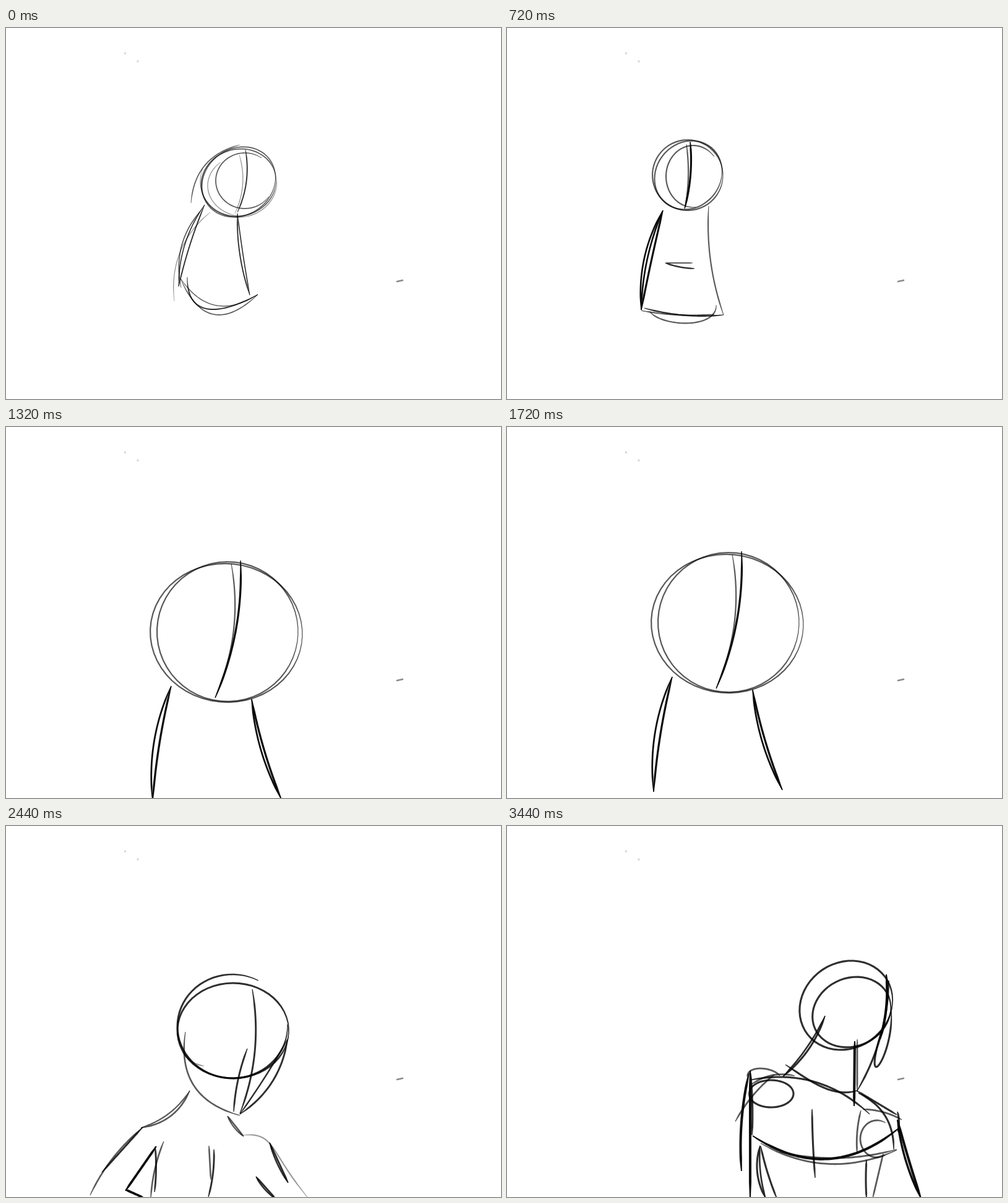
An HTML page with a canvas for the animation above (3480 ms loop, 800 px wide and 600 px high).

```html
<!DOCTYPE html>
<html lang="en">
<head>
<meta charset="utf-8">
<title>Turning figure sketch</title>
<style>
  html, body { margin: 0; width: 100%; height: 100%; overflow: hidden; background: #fff; }
  canvas { display: block; }
</style>
</head>
<body>
<canvas id="stage" width="800" height="600"></canvas>
<script>
const LOOP = 3480, N = 56;
const ctx = document.getElementById("stage").getContext("2d");
const mix = (a, b, k) => a + (b - a) * k;
const sample = f => Array.from({ length: N + 1 }, (_, i) => f(i / N));
const mark = f => ({ w: 1, a: .82, pts: sample(f) });

// One bowed stroke per bow, all between the same ends.
// Positive bows go left of a downward stroke and below a rightward one.
function arc(x0, y0, x1, y1, ...bows) {
  const dx = x1 - x0, dy = y1 - y0, len = Math.hypot(dx, dy);
  return bows.map(bow => mark(u => {
    const h = 4 * u * (1 - u) * bow / len;
    return [x0 + dx * u - dy * h, y0 + dy * u + dx * h];
  }));
}

// Part of an ellipse, angles in degrees, counted clockwise from the right
function loop(x, y, rx, ry, tilt = 0, from = 10, sweep = -375) {
  const r = Math.PI / 180, c = Math.cos(tilt * r), s = Math.sin(tilt * r);
  return [mark(u => {
    const t = (from + sweep * u - tilt) * r, p = rx * Math.cos(t), q = ry * Math.sin(t);
    return [x + p * c - q * s, y + p * s + q * c];
  })];
}

// Cubic curve between two ends with two handles
function bend(x0, y0, x1, y1, x2, y2, x3, y3) {
  const axis = (a, b, c, d, u) => {
    const v = 1 - u;
    return v * v * v * a + 3 * v * v * u * b + 3 * v * u * u * c + u * u * u * d;
  };
  return [mark(u => [axis(x0, x1, x2, x3, u), axis(y0, y1, y2, y3, u)])];
}

const press = (w, a) => list => list.map(s => ({ ...s, w, a }));
const bold = press(1.3, .95), soft = press(.9, .65), faint = press(.75, .4);

// Later passes of a part are drawn lighter
function pose(x, y, size, weight, parts) {
  const lines = {};
  for (const name in parts) {
    parts[name].forEach((s, i) => lines[name + i] = { ...s, w: s.w * weight * (i ? .85 : 1) });
  }
  return { head: [x, y, size], lines };
}

const warp = (s, f) => ({ ...s, pts: s.pts.map(([x, y]) => f(x, y)) });

function reshape(p, f) {
  const lines = {};
  for (const name in p.lines) lines[name] = warp(p.lines[name], f);
  return { head: [...f(p.head[0], p.head[1]), p.head[2]], lines };
}

const back = pose(376, 250, 61, 1.9, {
  headA: soft(loop(376, 250, 61, 54, -15)),
  headB: soft(loop(376, 249, 62, 54, -35)),
  inner: soft(loop(386, 247, 47, 45, 0, -55, -270)),
  ghost: faint(loop(376, 248, 62, 58, 0, 200, -200)),
  ghost2: faint(loop(386, 255, 60, 50, 0, 230, -130)),
  sweep: soft(arc(299, 283, 378, 189, -22)),
  mid: arc(387, 197, 374, 298, -8),
  mid2: faint(arc(377, 205, 370, 300, -9)),
  left: arc(321, 286, 279, 418, 3, 11),
  edge: soft(arc(315, 295, 283, 420, 16)),
  edge2: faint(arc(330, 298, 272, 442, 21)),
  right: arc(374, 300, 394, 432, 6, 1),
  hem: bend(293, 403, 292, 465, 340, 468, 407, 431),
  hem2: soft(arc(282, 405, 407, 431, 46, 31))
});

const small = pose(292, 238, 57, 2.4, {
  headA: soft(loop(292, 238, 57, 57)),
  headB: soft(loop(293, 238, 58, 52, -50)),
  inner: soft(loop(301, 240, 44, 50, 0, -40, -235)),
  mid: bold(arc(296, 184, 287, 292, -5)),
  mid2: soft(arc(290, 188, 288, 290, -4)),
  left: bold(arc(252, 295, 217, 456, 1, 8, 13)),
  right: soft(arc(326, 288, 350, 464, 9)),
  hem: arc(222, 453, 350, 464, 6),
  hem2: soft(bend(230, 458, 250, 484, 340, 487, 338, 448)),
  hem3: soft(arc(217, 457, 335, 463, 4)),
  belt: soft(arc(256, 380, 300, 380, 0)),
  belt2: arc(256, 380, 303, 389, 2)
});

const near = pose(356, 331, 120, 2.5, {
  headA: soft(loop(356, 333, 123, 112, 5)),
  headB: soft(loop(358, 331, 114, 113)),
  mid: bold(arc(379, 216, 338, 438, -13)),
  mid2: soft(arc(364, 221, 340, 432, -16)),
  left: bold(arc(267, 419, 237, 605, 4, 13)),
  right: bold(arc(397, 440, 445, 602, 4, 9))
});

const wide = pose(358, 322, 120, 2.9, {
  headA: loop(358, 322, 120, 116, 0, 8, -228),
  headB: loop(367, 328, 120, 113, 0, -88, -130),
  jaw: faint(arc(240, 350, 360, 474, 25)),
  jawR: soft(arc(481, 315, 372, 472, -12, -20)),
  chin: arc(440, 395, 360, 475, -3),
  brow: soft(arc(256, 372, 477, 377, 35)),
  mid: bold(arc(409, 258, 360, 474, -22)),
  mid2: soft(arc(391, 200, 400, 375, -12)),
  neckL: soft(arc(268, 425, 249, 483, -3)),
  armTopL: soft(arc(42, 343, 250, 453, 9)),
  armPatchL: bold(arc(142, 407, 245, 447, 4)),
  armBotL: bold(arc(42, 343, 205, 495, 12)),
  armPitL: soft(bend(150, 450, 220, 500, 254, 515, 254, 602)),
  torsoL: bold(arc(210, 495, 254, 597, 0, -4)),
  armTopR: arc(378, 478, 618, 485, -1),
  armPatchR: bold(arc(380, 479, 520, 481, 0)),
  handR: soft(bend(600, 485, 643, 476, 647, 517, 600, 517)),
  handR2: faint(arc(612, 485, 612, 512, -9)),
  armBotR: soft(arc(432, 518, 622, 514, 7, 9)),
  neckR: bold(arc(375, 469, 398, 520, 0, -3)),
  torsoR: bold(arc(429, 508, 420, 602, 2)),
  spine: arc(352, 503, 328, 597, -10),
  spine2: soft(arc(343, 503, 350, 560, 0)),
  collar: soft(arc(266, 529, 361, 559, 0)),
  dot: arc(339, 422, 340, 425, 0)
});

const lean = pose(367, 325, 88, 2.9, {
  headA: loop(366, 324, 89, 84, 0, -62, -300),
  headB: loop(367, 331, 90, 77),
  jaw: soft(arc(290, 333, 378, 468, 36)),
  jawR: arc(455, 345, 378, 466, -16, -2),
  cheek: faint(arc(285, 365, 320, 388, 5)),
  mid: arc(398, 264, 378, 465, -14),
  mid2: arc(390, 360, 368, 462, 4),
  neckL: soft(arc(297, 428, 218, 488, -14, -9)),
  armTopL: soft(arc(136, 597, 222, 487, -8)),
  armPatchL: arc(155, 560, 220, 488, 0),
  armBotL: bold(arc(193, 590, 243, 518, 0)),
  armPitL: soft(arc(255, 510, 234, 602, 4)),
  cuff: bold(arc(193, 588, 222, 601, 0)),
  torsoL: arc(241, 518, 240, 592, -2),
  neckR: soft(arc(358, 469, 384, 502, 0, 3)),
  armTopR: faint(bend(383, 500, 435, 495, 425, 525, 487, 600)),
  armPatchR: arc(426, 512, 456, 577, 0, 3),
  armBotR: arc(404, 567, 436, 603, 0, 3),
  spine: arc(336, 523, 327, 600, -3),
  spine2: soft(arc(328, 517, 331, 572, 0))
});

const side = pose(444, 327, 84, 3, {
  headA: loop(443, 327, 86, 78),
  headB: loop(441, 328, 72, 76),
  jaw: arc(362, 310, 473, 490, 22, 34),
  cheek: soft(arc(368, 345, 430, 475, 8)),
  brow: arc(357, 330, 376, 283, -5),
  jawR: bold(arc(521, 297, 471, 497, -2)),
  chin: soft(arc(529, 335, 475, 492, -6)),
  mid: soft(arc(508, 254, 473, 490, -16)),
  neckL: arc(382, 430, 280, 482, -8, -14),
  armTopL: bold(arc(269, 602, 312, 462, -17)),
  armPatchL: bold(arc(276, 597, 282, 500, -3)),
  neckR: bold(arc(425, 473, 440, 548, 4, 0)),
  flankR: soft(arc(440, 545, 456, 602, -7)),
  tick: faint(arc(440, 545, 460, 572, 0)),
  spine: bold(arc(345, 495, 347, 602, 0)),
  spine2: soft(arc(341, 487, 348, 602, 0))
});

const front = pose(548, 290, 74, 3.1, {
  headA: loop(548, 290, 78, 69, -35),
  headB: loop(557, 301, 65, 55, -25),
  throat: bend(450, 386, 490, 412, 525, 440, 566, 428),
  jawR: arc(617, 250, 566, 428, -12),
  temple: bold(arc(613, 240, 603, 345, -5)),
  ear: bend(621, 300, 625, 375, 570, 445, 607, 325),
  mid: bold(arc(562, 348, 561, 453, 0)),
  mid2: soft(arc(566, 345, 566, 428, 0)),
  neckL: arc(514, 307, 446, 405, -9, -5),
  chest: arc(392, 411, 586, 466, -26),
  capL: soft(bend(388, 405, 390, 386, 430, 390, 441, 404)),
  capL2: soft(arc(395, 418, 465, 404, -8)),
  pecL: loop(427, 433, 36, 22, 0, 190),
  flankL: arc(393, 395, 396, 500, -2),
  rib: bold(arc(397, 501, 634, 488, 44)),
  rib2: soft(arc(410, 513, 630, 524, 28)),
  rib3: soft(arc(440, 527, 630, 523, 12)),
  armTopL: bold(arc(393, 602, 393, 397, 0)),
  armPatchL: bold(arc(379, 558, 391, 400, -6)),
  armCrease: soft(arc(369, 478, 432, 402, -5)),
  waistL: arc(409, 517, 418, 602, 9, 4),
  waistL2: arc(410, 518, 436, 602, 2),
  neckR: arc(565, 428, 630, 467, 0),
  neckR2: arc(568, 432, 625, 523, -17),
  capR: soft(arc(575, 458, 638, 475, -4)),
  pecR: soft(loop(598, 506, 27, 30, 0, -60, -240)),
  flankR: soft(arc(572, 460, 566, 530, 3)),
  ribEnd: arc(631, 462, 632, 495, -2),
  armTopR: bold(arc(631, 475, 669, 602, 1, 6)),
  waistR: arc(581, 540, 581, 602, 1),
  waistR2: soft(arc(608, 530, 591, 602, 0)),
  spine: arc(493, 458, 498, 569, 1)
});

const armsOf = p => Object.fromEntries(Object.entries(p.lines).filter(([name]) => name.startsWith("arm")));
const handless = Object.fromEntries(Object.entries(wide.lines).filter(([name]) => !name.startsWith("hand")));
const rising = { head: wide.head, lines: { ...handless, ...armsOf(lean) } };

const reach = (x, y) => [
  x < 250 ? 250 + (x - 250) * 1.19 : x > 430 ? 430 + (x - 430) * 1.05 : x, y + 25
];

const keys = [
  [0, back],
  [560, reshape(small, (x, y) => [x - 69, y * .965 + 5])],
  [720, small],
  [1160, reshape(near, (x, y) => [x - 1, y + 6])],
  [1320, near],
  [1720, reshape(near, (x, y) => [x, y - 15])],
  [1880, rising],
  [2120, wide],
  [2280, reshape(wide, reach)],
  [2440, lean],
  [2960, side],
  [3440, front]
];

// Start of the drawing on show; the 80 ms count restarts twice
function drawingStart(t) {
  const base = t < 1160 ? 0 : t < 2880 ? 1160 : 2880;
  return base + Math.floor((t - base) / 80) * 80;
}

function noise(seed) {
  const v = Math.sin(seed * 12.9898) * 43758.5453;
  return (v - Math.floor(v)) * 2 - 1;
}

function blend(a, b, k) {
  return {
    w: mix(a.w, b.w, k), a: mix(a.a, b.a, k),
    pts: a.pts.map((p, i) => [mix(p[0], b.pts[i][0], k), mix(p[1], b.pts[i][1], k)])
  };
}

// Shared strokes morph; the others follow the head and swap halfway
function linesAt(time) {
  let i = 0;
  while (i < keys.length - 2 && time >= keys[i + 1][0]) i++;
  const [t0, a] = keys[i], [t1, b] = keys[i + 1];
  const u = (time - t0) / (t1 - t0), k = u * u * (3 - 2 * u);
  const head = a.head.map((v, c) => mix(v, b.head[c], k));
  const follow = (s, from) => {
    const z = head[2] / from[2];
    return warp(s, (x, y) => [head[0] + (x - from[0]) * z, head[1] + (y - from[1]) * z]);
  };
  const out = [];
  for (const name of new Set([...Object.keys(a.lines), ...Object.keys(b.lines)])) {
    const p = a.lines[name], q = b.lines[name];
    if (p && q) out.push(blend(p, q, k));
    else if (p && k < .5) out.push(follow(p, a.head));
    else if (q && k >= .5) out.push(follow(q, b.head));
  }
  // in-betweens wobble a little, key drawings stay put
  const wobble = 5 * u * (1 - u);
  return out.map((s, n) => {
    const dx = noise(time + n * 7) * wobble, dy = noise(time + n * 13 + 5) * wobble;
    return warp(s, (x, y) => [x + dx, y + dy]);
  });
}

// Brush stroke with thinner ends
function ink({ w, a, pts }) {
  const left = [], right = [];
  pts.forEach(([x, y], i) => {
    const p = pts[Math.max(0, i - 1)], q = pts[Math.min(N, i + 1)];
    const dx = q[0] - p[0], dy = q[1] - p[1], len = Math.hypot(dx, dy) || 1;
    const end = Math.min(i, N - i) / N;
    const h = w / 2 * (.45 + .55 * Math.min(1, end * 8)) / len;
    left.push([x - dy * h, y + dx * h]);
    right.unshift([x + dy * h, y - dx * h]);
  });
  ctx.fillStyle = `rgba(0,0,0,${a})`;
  ctx.beginPath();
  for (const [x, y] of left.concat(right)) ctx.lineTo(x, y);
  ctx.fill();
}

function specks() {
  ctx.fillStyle = "#d4d4d4";
  for (const [x, y] of [[192.5, 41], [213, 54]]) {
    ctx.beginPath();
    ctx.arc(x, y, 1.7, 0, 7);
    ctx.fill();
  }
  ctx.strokeStyle = "#8a8a8a";
  ctx.lineWidth = 2.6;
  ctx.lineCap = "round";
  ctx.beginPath();
  ctx.moveTo(632, 410);
  ctx.lineTo(641, 408);
  ctx.stroke();
}

let shown = -1;
function draw(now) {
  const time = drawingStart(now % LOOP);
  if (time === shown) return;
  shown = time;
  ctx.fillStyle = "#fff";
  ctx.fillRect(0, 0, 800, 600);
  specks();
  linesAt(time).forEach(ink);
}

const began = performance.now();
function tick() {
  draw(performance.now() - began);
  requestAnimationFrame(tick);
}
tick();
</script>
</body>
</html>
```
